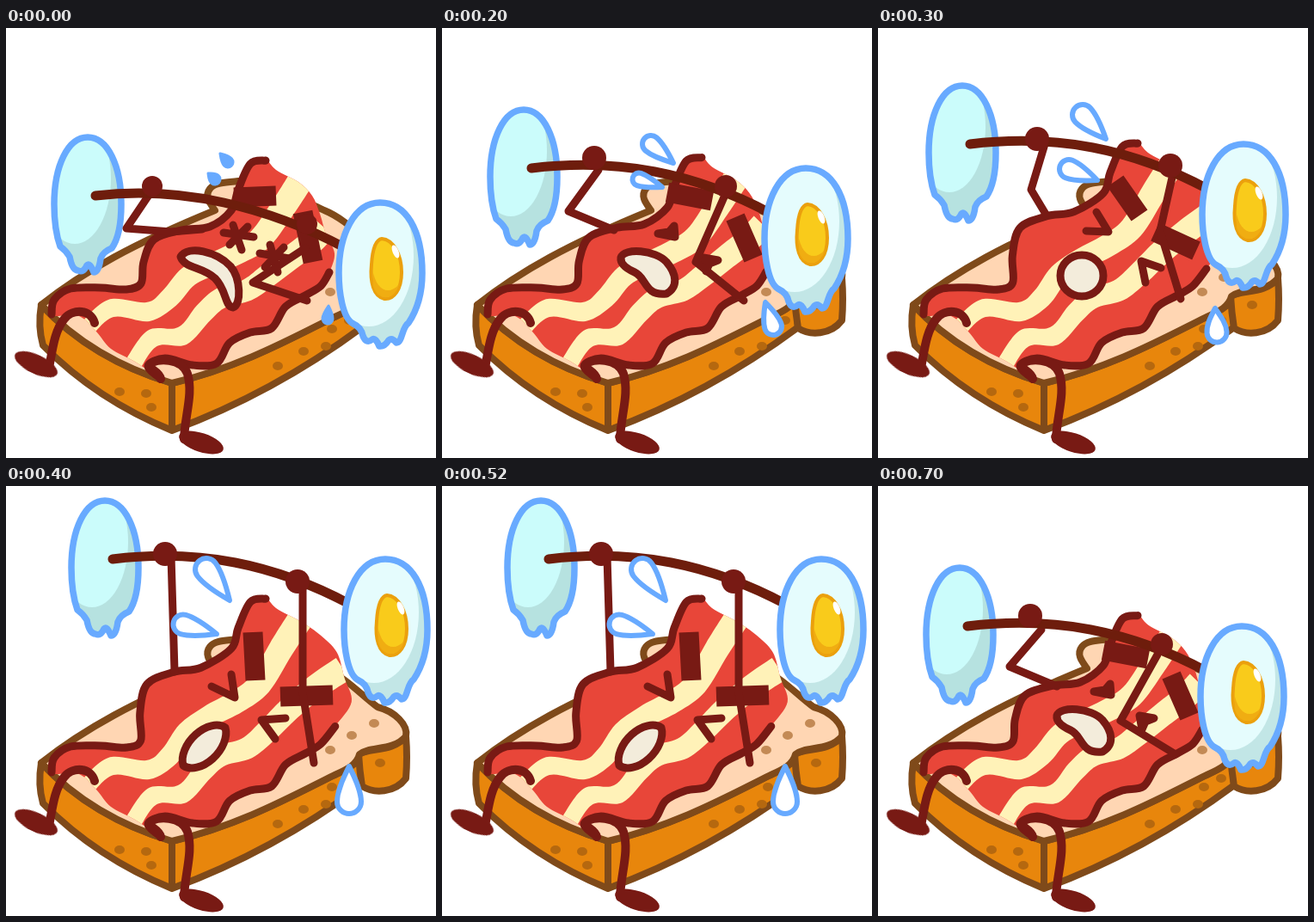
Animation of 500x500 px, one loop 0.8 s. Source, as an HTML page:

```html
<!DOCTYPE html>
<html lang="en">
<head>
<meta charset="utf-8">
<title>Breakfast bench press</title>
<style>
html, body { margin: 0; width: 100%; height: 100%; overflow: hidden; background: #fff; }
svg { display: block; width: 100vw; height: 100vh; }
</style>
</head>
<body>
<svg id="stage" viewBox="0 0 500 500" fill="none" stroke-linecap="round" stroke-linejoin="round"></svg>
<script>
const DARK = '#781a14', RED = '#e84639', CREAM = '#fff2b8', BROWN = '#7f4a1a',
      CRUST = '#e8860c', CRUMB = '#ffd6b3', BLUE = '#68aaff', BAR = '#6e1d0c';
const LOOP = 800;

const pts = s => s.trim().split(/\s+/).map(p => p.split(',').map(Number));
const fix = n => +n.toFixed(1);
const clamp = n => Math.max(0, Math.min(1, n));

// Catmull-Rom segments through the points, without the leading move.
function segs(p) {
  let d = '';
  for (let i = 0; i < p.length - 1; i++) {
    const b = p[i], c = p[i + 1], a = p[i - 1] ?? b, e = p[i + 2] ?? c;
    d += 'C' + [b[0] + (c[0] - a[0]) / 6, b[1] + (c[1] - a[1]) / 6,
      c[0] - (e[0] - b[0]) / 6, c[1] - (e[1] - b[1]) / 6, c[0], c[1]].map(fix).join(' ');
  }
  return d;
}
const curve = p => `M${p[0].map(fix)}` + segs(p);
const line = (d, w = 9, c = DARK, cap = 'round') =>
  `<path d="${d}" stroke="${c}" stroke-width="${w}" stroke-linecap="${cap}"/>`;
const shape = (d, fill, stroke = 'none', w = 0) =>
  `<path d="${d}" fill="${fill}" stroke="${stroke}" stroke-width="${w}"/>`;
const dot = (x, y, rx, ry, fill, turn = 0) =>
  `<ellipse cx="${x}" cy="${y}" rx="${rx}" ry="${ry}" fill="${fill}" transform="rotate(${turn} ${x} ${y})"/>`;

// Band around a centre line, widening from w0 to w1.
function ribbon(p, w0, w1) {
  const a = [], b = [];
  p.forEach(([x, y], i) => {
    const q = p[i - 1] ?? p[i], r = p[i + 1] ?? p[i];
    const dx = r[0] - q[0], dy = r[1] - q[1];
    const h = (w0 + (w1 - w0) * i / (p.length - 1)) / 2 / Math.hypot(dx, dy);
    a.push([x - dy * h, y + dx * h]);
    b.unshift([x + dy * h, y - dx * h]);
  });
  return curve(a) + `L${b[0].map(fix)}` + segs(b) + 'Z';
}

// Teardrop with its tip at tx,ty and its round end at cx,cy.
function drop([tx, ty, cx, cy, r, solid]) {
  const d = fix(Math.hypot(tx - cx, ty - cy)), turn = fix(Math.atan2(ty - cy, tx - cx) * 180 / Math.PI);
  return `<path transform="translate(${cx} ${cy}) rotate(${turn})" fill="${solid ? BLUE : '#fff'}"
    stroke="${BLUE}" stroke-width="${solid ? 3 : 6}" d="M${d} 0C${d * .6} ${-r * .6} ${r * .8} ${-r} 0 ${-r}
    A${r} ${r} 0 0 0 0 ${r}C${r * .8} ${r} ${d * .6} ${r * .6} ${d} 0Z"/>`;
}

function toast() {
  const front = 'C408 325 395 330 380 337C330 362 270 395 193 413Q100 385 41 322';
  const side = `M41 322C38 340 39 355 43 369Q105 432 193 468Q310 425 414 348L411 312${front}Z`;
  const ear = 'M410 312C422 304 450 310 465 291Q467 315 465 340C452 357 428 358 414 349Q411 330 410 312Z';
  const top = 'M41 322C90 283 150 250 243 212C238 205 230 196 237 187C243 179 256 180 270 178' +
    'C310 188 345 200 370 212C395 222 415 245 432 257C452 262 468 278 465 291' +
    `C450 309 423 302 411 312${front}Z`;
  const holes = pts('132,423 163,425 169,441 316,393 346,376 372,370 379,350 399,340 435,322');
  const crumbs = pts('377,307 402,290 428,276');
  return [[side, CRUST], [ear, CRUST], [top, CRUMB]].map(([d, c]) => shape(d, c, BROWN, 8)).join('') +
    line('M193 413V467', 8, BROWN) +
    holes.map(h => dot(...h, 6, 5, '#b5680f')).join('') +
    crumbs.map(h => dot(...h, 6, 5, '#c38a55')).join('');
}

const legs = line('M103 343C99 327 78 326 68 338C56 352 54 375 50 395', 10) +
  line('M180 408C178 398 165 397 167 391C175 383 205 384 211 402C218 425 208 450 207 478', 10) +
  dot(35, 391, 27, 11, DARK, 25) + dot(227, 482, 27, 11, DARK, 18);

const EGG_BACK = 'M56 205C56 160 72 127 95 127S134 160 134 205C134 228 130 246 123 256Q113 260 110 268' +
  'Q108 284 102 284Q97 272 94 276Q90 285 84 282Q77 282 74 266Q70 259 63 254C58 240 56 222 56 205Z';
const EGG_FRONT = 'M387 285C387 240 405 203 435 203S484 235 484 285C484 310 478 328 468 343' +
  'C460 348 461 366 454 366Q449 360 445 363Q440 371 434 370Q430 360 426 362Q419 368 415 358' +
  'Q413 348 404 344C391 338 387 305 387 285Z';

function egg(d, id, [x, y], shade, light, inner = '') {
  return `<g transform="translate(${x} ${y})"><clipPath id="${id}"><path d="${d}"/></clipPath>
    <g clip-path="url(#${id})">${shape(d, shade)}${dot(...light)}</g>${inner}${line(d, 7.5, BLUE)}</g>`;
}
const yolk = shape('M437 245C450 246 460 263 460 284C460 304 451 316 440 315C427 312 423 295 425 275C426 258 430 246 437 245Z',
    '#f9cb1b', '#eba00d', 4) +
  shape('M426 280C430 305 445 312 457 298C452 318 432 318 427 300Z', '#f0ad12') +
  dot(453, 260, 3.5, 8, '#fff', -22);

// Bacon lying down; raise() lifts its upper part and spreads the shoulders.
const BACON = {
  left: pts('53,333 56,316 75,303 110,302 140,304 157,297 160,272 172,246 205,235 237,231 262,212 270,188 284,158 302,154'),
  head: pts('302,150 314,165 340,179 356,195 365,216 372,240 382,262'),
  right: pts('376,284 366,300 348,311 325,324 309,349 284,354 260,366 245,390 217,392 185,384 165,393 180,408'),
  foot: pts('150,388 122,373 105,353 85,335 58,335'),
  stripes: ['92,352 122,326 165,330 190,314 212,289 240,275 268,262 295,246 320,212 342,178',
    '146,394 170,361 205,358 230,331 250,314 280,305 303,289 330,268 356,248 370,232'].map(pts)
};
const raise = k => ([x, y]) => {
  const h = k * clamp((300 - y) / 80);
  const spread = x < 250 ? -12 : 1.3 * Math.max(0, x - 350);
  return [x + spread * h, y - 23 * h];
};

function bacon(k, id) {
  const up = p => p.map(raise(k));
  const left = up(BACON.left), head = up(BACON.head), right = up(BACON.right);
  const body = curve(left) + `L${head[0].map(fix)}` + segs([...head, ...right, ...BACON.foot]) + 'Z';
  return `<clipPath id="${id}"><path d="${body}"/></clipPath>` + shape(body, RED) +
    `<g clip-path="url(#${id})">${BACON.stripes.map(s => shape(ribbon(up(s), 20, 30), CREAM)).join('')}</g>` +
    line(curve(left)) + line(curve(right)) + legs;
}

function bar([bx, by], [fx, fy]) {
  const x0 = 104 + bx, y0 = 195 + by, x1 = 395 + fx, y1 = 256 + fy;
  return line(`M${x0} ${y0}C${x0 + 100} ${y0 - 12} ${x1 - 90} ${y1 - 48} ${x1} ${y1}`, 11, BAR);
}

const POSES = {
  rest: {
    lift: 0, back: [0, 0], front: [0, 0], hands: [[170, 184, 12], [350, 228, 12]],
    brows: 'M265 197L314 195M345 214L357 272',
    eyes: 'M253 238L288 243M264 229L274 258M281 231L260 252M295 262L329 268M307 252L316 284M323 255L301 278',
    mouth: 'M203 266C212 252 245 260 261 277C273 291 274 322 264 325C254 324 257 305 243 291C228 277 208 280 203 266Z'
  },
  low: {
    lift: .15, back: [0, -32], front: [-12, -40], hands: [[177, 151, 14], [330, 184, 13]],
    brows: 'M262 191L314 201M341 220L362 268',
    eyes: 'M251 239L271 243L270 230L264 237ZM307 283L304 267L321 270L311 274Z',
    mouth: 'M208 267C212 255 248 258 261 272C273 286 275 301 261 309C235 312 238 290 224 284C215 280 207 275 208 267Z'
  },
  mid: {
    lift: .87, back: [3, -60], front: [-10, -68], hands: [[185, 129, 14], [340, 160, 14]],
    brows: 'M276 178L304 218M322 237L370 259',
    eyes: 'M254 214L268 237L242 236M329 279L306 271L311 296',
    mouth: 'M262 288A25 24 0 1 1 212 288A25 24 0 1 1 262 288Z'
  },
  high: {
    lift: 1, back: [20, -110], front: [6, -118], hands: [[185, 79, 14], [339, 111, 14]],
    brows: 'M287 170L290 226M319 245L380 243',
    eyes: 'M262 219L266 246L239 233M325 270L297 272L313 294',
    mouth: 'M255 281A34 22 -47 0 1 206 325A34 22 -47 0 1 255 281Z'
  }
};

const midArms = 'M194 135L178 188L196 218M344 165L328 236L352 315';
const STEPS = [
  { at: 0, pose: 'rest', arms: 'M169 190L140 233L192 237L228 234M348 256L287 296L350 317',
    drops: [[249, 146, 258, 156, 6, 1], [235, 169, 243, 176, 6, 1], [375, 323, 374, 338, 6, 1]] },
  { at: 200, pose: 'low', arms: 'M182 165L147 213L200 235M330 192L295 272L351 317',
    drops: [[269, 157, 243, 135, 10], [256, 185, 229, 176, 7.5], [376, 319, 385, 347, 10]] },
  { at: 300, pose: 'mid', arms: midArms,
    drops: [[265, 129, 238, 101, 12], [255, 177, 222, 164, 11], [392, 326, 394, 354, 11.5]] },
  { at: 400, pose: 'high', arms: 'M192 82L196 216M345 115L345 240L358 322',
    drops: [[260, 133, 233, 97, 13], [245, 172, 206, 161, 11.5], [399, 326, 399, 367, 14]] },
  { at: 600, pose: 'mid', arms: midArms,
    drops: [[243, 110, 227, 91, 10], [205, 179, 183, 182, 10], [405, 360, 407, 384, 11.5]] },
  { at: 700, pose: 'low', arms: 'M190 167L153 210L208 233M325 196L282 273L346 312', drops: [] }
];

function draw({ pose, arms, drops }, i) {
  const p = POSES[pose];
  return bacon(p.lift, 'bacon' + i) +
    line(p.brows, 23, DARK, 'butt') + line(p.eyes) + shape(p.mouth, '#f3ecdb', DARK, 9) +
    egg(EGG_BACK, 'back' + i, p.back, '#b6e2e0', [80, 175, 42, 76, '#cbfcfb']) +
    line(arms) + bar(p.back, p.front) +
    p.hands.map(([x, y, r]) => dot(x, y, r, r, DARK)).join('') +
    egg(EGG_FRONT, 'front' + i, p.front, '#c2e6e6', [422, 265, 52, 82, '#e5fcfd'], yolk) +
    drops.map(drop).join('');
}

const stage = document.getElementById('stage');
stage.innerHTML = toast() + STEPS.map((s, i) => `<g class="step" opacity="${i ? 0 : 1}">${draw(s, i)}</g>`).join('');

stage.querySelectorAll('.step').forEach((g, i) => {
  const from = STEPS[i].at / LOOP, to = (STEPS[i + 1]?.at ?? LOOP) / LOOP;
  const keys = [{ opacity: 1, offset: from }, { opacity: +(to === 1), offset: to }];
  if (from > 0) keys.unshift({ opacity: 0, offset: 0 });
  if (to < 1) keys.push({ opacity: 0, offset: 1 });
  g.animate(keys.map(k => ({ ...k, easing: 'step-end' })), { duration: LOOP, iterations: Infinity });
});
</script>
</body>
</html>
```
